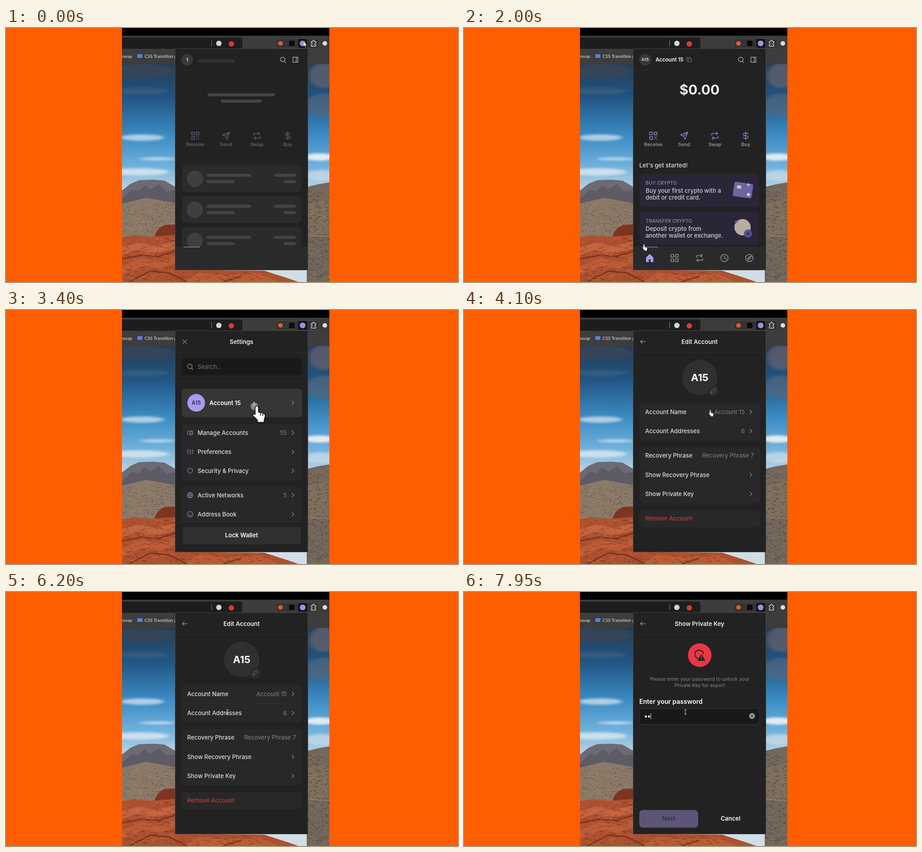
An HTML page for the animation above (8000 ms loop, 998 by 561 pixels).

```html
<!DOCTYPE html>
<html lang="en">
<head>
<meta charset="utf-8">
<title>Wallet popup</title>
<style>
html, body { margin: 0; width: 100%; height: 100%; overflow: hidden; background: #ff5e00; }
svg { display: block; width: 100%; height: 100%; }
text { font-family: Inter, sans-serif; white-space: pre; }
.bar text { font-family: Lato, sans-serif; }
</style>
</head>
<body>
<svg id="stage" viewBox="0 0 998 561"></svg>
<script>
const LOOP = 8000;
const LILAC = '#a99bee';

// Drawing helpers
const rect = (x, y, w, h, fill, r = 0, extra = '') =>
  `<rect x="${x}" y="${y}" width="${w}" height="${h}" rx="${r}" fill="${fill}" ${extra}/>`;
const disc = (x, y, r, fill, extra = '') => `<circle cx="${x}" cy="${y}" r="${r}" fill="${fill}" ${extra}/>`;
const shape = (d, fill, extra = '') => `<path d="${d}" fill="${fill}" ${extra}/>`;
const icon = (x, y, d, color = '#aaa', width = 1.4) =>
  `<path transform="translate(${x} ${y})" d="${d}" fill="none" stroke="${color}" stroke-width="${width}" stroke-linecap="round" stroke-linejoin="round"/>`;
const text = (x, y, str, color = '#ddd', size = 12.9, weight = 500, anchor = 'start') =>
  `<text x="${x}" y="${y + size * 0.36}" fill="${color}" font-size="${size}" font-weight="${weight}" text-anchor="${anchor}">${str}</text>`;
const centered = (x, y, str, color, size, weight = 600) => text(x, y, str, color, size, weight, 'middle');
const group = (id, body, extra = '') => `<g id="${id}" ${extra}>${body}</g>`;
const rule = (y, x = 374, w = 292) => rect(x, y, w, 1, '#2e2e2e');
const panel = (y, h, fill = '#282828') => rect(388, y, 266, h, fill, 8);

let seed = 7;
const random = () => (seed = seed * 16807 % 2147483647) / 2147483647;
function specks(count, x, y, w, h, color, length, opacity) {
  let d = '';
  for (let i = 0; i < count; i++) {
    const px = x + random() * w, py = y + random() * h;
    d += `M${px.toFixed(1)} ${py.toFixed(1)}l${(length * random()).toFixed(1)} ${((random() - 0.5) * length / 3).toFixed(1)}`;
  }
  return `<path d="${d}" stroke="${color}" stroke-width="1.3" opacity="${opacity}"/>`;
}

const ICONS = {
  search: 'M4 4L6.5 6.5M5-.5A5 5 0 1 1-5-.5A5 5 0 1 1 5-.5',
  side: 'M-5.5-5.5h11v11h-11zM2-5.5v11',
  copy: 'M-2-2h7v7h-7zM-2 2h-3v-7h7v3',
  close: 'M-4-4L4 4M4-4L-4 4',
  back: 'M6 0H-5M-1-4L-5 0L-1 4',
  next: 'M-2-4L2 0L-2 4',
  qr: 'M-8-8h6v6h-6zM2-8h6v6h-6zM-8 2h6v6h-6zM2 2h2M7 2h1M4 5h2M2 8h1M7 8h1',
  send: 'M8-8L-8-2L-1 1L2 8ZM-1 1L8-8',
  swap: 'M-7-1V-5H6M3-8L6-5L3-2M7 1V5H-6M-3 2L-6 5L-3 8',
  buy: 'M0-9V9M5-4Q4-6 0-6Q-5-6-5-3T0 0T5 3T0 6Q-4 6-5 4',
  grid: 'M-8-8h6v6h-6zM2-8h6v6h-6zM-8 2h6v6h-6zM2 2h6v6h-6z',
  clock: 'M8 0A8 8 0 1 1-8 0A8 8 0 1 1 8 0M0-5V0L4 2',
  compass: 'M8 0A8 8 0 1 1-8 0A8 8 0 1 1 8 0M4-4L1.5 1.5L-4 4L-1.5-1.5Z',
  wallet: 'M5-2V-4H-3Q-5.5-4-5.5-1V2Q-5.5 4.5-3 4.5H3Q5 4.5 5 2M6-2H1Q-1-2-1 0T1 2H6Z',
  sliders: 'M-5-5V-1M-5 2V5M0-5V1M0 4V5M5-5V-3M5 0V5M-6.5-1h3M-1.5 3h3M3.5-1.5h3',
  shield: 'M0-6L5-4V0Q5 4 0 6Q-5 4-5 0V-4Z',
  globe: 'M6 0A6 6 0 1 1-6 0A6 6 0 1 1 6 0M-6 0H6M0-6Q-5 0 0 6Q5 0 0-6',
  face: 'M6 0A6 6 0 1 1-6 0A6 6 0 1 1 6 0M-2-1.5v.2M2-1.5v.2M-2.5 2Q0 4 2.5 2',
  pencil: 'M-5 5L-4 1L2-5Q4-6 5-4T5-2L-1 4Z',
  puzzle: 'M-5-4H-2Q-2-7 0-7T2-4H5V-1Q3-1 3 1T5 3V6H-5V3Q-3 3-3 1T-5-1Z'
};
const chevron = y => icon(633.5, y, ICONS.next, '#858585');

function scenery() {
  const cloud = (x, y, rx, ry, color, opacity) =>
    `<ellipse cx="${x}" cy="${y}" rx="${rx}" ry="${ry}" fill="${color}" opacity="${opacity}" filter="url(#soft)"/>`;
  return rect(256, 78, 458, 483, 'url(#sky)') +
    cloud(300, 95, 70, 16, '#3d4756', 0.7) + cloud(300, 139, 60, 7, '#536d86', 0.4) +
    cloud(701, 105, 32, 28, '#5b5f70', 0.85) + cloud(700, 170, 38, 25, '#59677d', 0.65) +
    cloud(301, 242, 48, 7, '#d7e4ed', 0.75) + cloud(335, 289, 40, 3, '#e4eef5', 0.75) +
    cloud(295, 318, 65, 8, '#dfe9f0', 0.8) + cloud(692, 285, 34, 8, '#f0f3f4', 0.9) +
    cloud(695, 326, 35, 12, '#d0dfe9', 0.65) +
    shape('M256 359L275 344L294 336L325 335L350 337L374 351V395H256Z', '#6d6a73') +
    shape('M256 378L278 357L292 361L306 347L319 357L337 345L355 361L374 358V395H256Z', '#55535f', 'opacity=".65"') +
    shape('M256 388L310 375L374 387V561H256Z', '#8b7968') +
    shape('M664 351L690 345L714 341V561H664Z', '#74675b') +
    shape('M664 390L714 376V455H664Z', '#85735f', 'opacity=".7"') +
    specks(260, 256, 388, 118, 72, '#4a4238', 5, 0.5) +
    specks(130, 256, 388, 118, 72, '#b39c80', 4, 0.5) +
    specks(260, 664, 355, 50, 202, '#3d3834', 6, 0.6) +
    specks(130, 664, 355, 50, 202, '#a8967e', 4, 0.4) +
    shape('M664 457L714 461', 'none', 'stroke="#a99987"') +
    shape('M328 461Q333 441 352 435L374 434V475H328Z', '#7e3520') +
    shape('M256 462L280 458L320 461L374 457V534L570 536L620 552L646 561H256Z', '#ad5130') +
    shape('M256 484L293 474L329 482L374 472V488L330 496L287 490L256 502Z', '#c96a41', 'opacity=".8"') +
    shape('M256 526L300 508L340 516L374 503V518L340 532L306 525L256 545ZM392 561L430 540L480 546L560 541L600 561Z', '#c4623a', 'opacity=".7"') +
    shape('M256 510L299 502L335 505L374 493M272 561L318 537L360 541L400 561M480 561L520 548', 'none', 'stroke="#662b1c" stroke-width="3" opacity=".7"') +
    specks(150, 256, 465, 118, 94, '#692e1e', 11, 0.55) +
    specks(80, 256, 465, 118, 94, '#dc8057', 9, 0.5) +
    specks(90, 374, 538, 200, 22, '#692e1e', 11, 0.5);
}

function browser() {
  return rect(256, 0, 458, 18, '#000') + rect(256, 17, 458, 62, '#3c3c3c') +
    rect(250, 21, 272, 25, '#1d1d1d', 5) + rect(256, 46, 458, 33, '#3d3d3d') +
    rect(453.5, 27, 1, 13, '#888') +
    disc(470, 34, 6, '#d4d4d4') + disc(497.5, 35, 6, '#d83b31') +
    rect(595.5, 23.5, 96, 21, '#343434', 5, 'stroke="#56483f"') +
    disc(606, 34, 5, '#e8592f') + rect(625, 28, 12, 12, '#0b0b0b', 1) +
    rect(645, 24, 20, 20, '#15131d', 4) + disc(655, 34, 6.3, '#9f91df') +
    icon(679, 34, ICONS.puzzle, '#d5d5d5', 1.3) + disc(704, 34, 5, '#dedede') +
    text(256, 62, 'swap', '#ddd', 10, 400) + rect(290, 58, 11, 8, '#5b81d8') +
    text(306, 62, 'CSS Transition g', '#e5e5e5', 10, 400);
}

function homePage() {
  const actions = [['qr', 'Receive'], ['send', 'Send'], ['swap', 'Swap'], ['buy', 'Buy']]
    .map(([name, label], i) => icon(418 + 68 * i, 238, ICONS[name], '#8e84c6', 1.5) +
      centered(418 + 68 * i, 257.5, label, '#929292', 10.7)).join('');
  const row = y => rect(388, y, 264, 59, '#2b2b2b', 8) + disc(417, y + 30, 18, '#403f3d') +
    [[443, 19, 98], [443, 33, 61], [592, 19, 48], [613, 33, 27]]
      .map(([x, dy, w]) => rect(x, y + dy, w, 6.5, '#454443', 3)).join('');
  const card = (y, title, first, second) => rect(388, y, 264, 73, '#292637', 8) +
    text(401, y + 20, title, '#918d9a', 10.7) + text(401, y + 37, first, '#cfcdd4') + text(401, y + 52, second, '#cfcdd4');
  const nav = shape('M402 507L410 499L418 507V517H412V511H408V517H402Z', LILAC) +
    ['grid', 'swap', 'clock', 'compass'].map((name, i) => icon(465 + 55 * i, 508, ICONS[name], '#949494', 1.6)).join('');
  return rect(374, 46, 292, 488, '#222') + rule(93) +
    disc(400, 70, 13, '#383838') +
    group('waitName', centered(400, 70, '1', '#eee', 10.5) + rect(424, 69, 80, 8, '#303030', 2)) +
    group('accountName', centered(400, 70, 'A15', '#ddd', 9.5) + text(423, 70, 'Account 15', '#fff', 11.5, 600) + icon(497, 70, ICONS.copy, '#777', 1.1)) +
    icon(611, 70, ICONS.search, '#aaa') + icon(639, 70, ICONS.side, '#aaa') +
    group('waitBalance', rect(445, 144, 149, 7, '#454443', 3) + rect(474, 158, 91, 7, '#454443', 3)) +
    group('balance', centered(520, 136, '$0.00', '#eee', 30, 700)) +
    group('actions', actions) +
    `<g clip-path="url(#list)">` +
    group('waitRows', [303, 371.5, 440].map(row).join('')) +
    group('cards', text(387, 303, 'Let\'s get started!', '#ccc', 13, 600) +
      card(322, 'BUY CRYPTO', 'Buy your first crypto with a', 'debit or credit card.') +
      `<g transform="rotate(8 616 358)">${rect(595, 342, 42, 32, '#71659f', 4)}${rect(602, 349, 9, 7, '#d6c4a8', 1)}</g>` +
      disc(628, 368, 3.5, '#d3cfe0') + icon(628, 346, 'M0-3V3M-3 0H3', '#d6d1e8') +
      group('deposit', card(406, 'TRANSFER CRYPTO', 'Deposit crypto from', 'another wallet or exchange.') +
        disc(615, 440, 18, '#b9ada2') + disc(627, 454, 9, '#555298') + icon(627, 454, 'M-4 0H4M0-4V4', '#27264a') +
        icon(601, 428, 'M0-3V3M-3 0H3', '#6d67ac', 2))) +
    '</g>' + rect(374, 483, 292, 51, '#2a2a2a') + rect(392, 483, 36, 1.5, '#817caf') + group('nav', nav);
}

const pageTop = (title, symbol) => rect(374, 46, 292, 488, '#222') + rule(93) +
  icon(394.5, 70, ICONS[symbol], '#898989') + centered(520, 70, title, '#eee', 13);

function settingsPage() {
  const row = (y, name, label, count = '') => icon(406.5, y, ICONS[name], '#8f91ce', 1.1) +
    text(423, y, label) + text(620, y, count, '#808080', 12.9, 400, 'end') + chevron(y);
  return pageTop('Settings', 'close') + rect(389, 106, 264, 38, '#191919', 4) +
    icon(406, 125, ICONS.search, '#888') + text(423, 125, 'Search...', '#777', 12.9, 400) + rule(156) +
    panel(174, 63) + group('hover', panel(174, 63, '#363636')) + disc(420, 205, 19.5, LILAC) +
    centered(420, 205, 'A15', '#302b45', 11.8) + text(449, 205, 'Account 15', '#fff', 13, 600) + chevron(205) +
    panel(252, 124) + rule(292, 389, 264) + rule(334, 389, 264) +
    row(271, 'wallet', 'Manage Accounts', 55) + row(313, 'sliders', 'Preferences') + row(355, 'shield', 'Security &amp; Privacy') +
    panel(390, 100) + rule(430, 389, 264) + row(409, 'globe', 'Active Networks', 5) + row(451, 'face', 'Address Book') +
    rect(374, 468, 292, 66, '#222') + rule(468) + rect(390, 479, 261, 38, '#303030', 4) + centered(520, 497.5, 'Lock Wallet', '#fff', 13);
}

function editPage() {
  const row = (y, label, value = '', arrow = true) => text(400, y, label) +
    text(arrow ? 620 : 640, y, value, '#838383', 12.9, 400, 'end') + (arrow ? chevron(y) : '');
  return pageTop('Edit Account', 'back') + disc(520.5, 149, 39, '#303030') + centered(520.5, 149, 'A15', '#fff', 22, 700) +
    disc(550, 179, 12, '#2c2c2c') + icon(550, 179, ICONS.pencil, '#858585', 1) +
    panel(206, 82) + rule(246, 389, 264) + row(225, 'Account Name', 'Account 15') + row(267, 'Account Addresses', 6) +
    panel(303, 124) + rule(343, 389, 264) + rule(385, 389, 264) +
    row(321.5, 'Recovery Phrase', 'Recovery Phrase 7', false) + row(364, 'Show Recovery Phrase') + row(406, 'Show Private Key') +
    panel(442, 38) + text(400, 460, 'Remove Account', '#c93636');
}

function passwordPage() {
  return pageTop('Show Private Key', 'back') + disc(520.5, 139.5, 26, '#e93745') +
    icon(519, 139, 'M-3 8Q-9 5-9-1V-7L0-11L9-7V-2', '#292326', 2) + shape('M524 137L533 152H515Z', '#292326') +
    icon(524, 146, 'M0-4V0M0 3V3.2', '#e93745', 1.5) +
    centered(520.5, 192, 'Please enter your password to unlock your', '#868686', 10.9, 400) +
    centered(520.5, 206, 'Private Key for export', '#868686', 10.9, 400) +
    text(387, 242, 'Enter your password', '#fff', 14, 600) +
    rect(387.5, 257.5, 265, 35, '#191919', 8, 'stroke="#353535"') +
    group('dot1', disc(401.5, 275, 2.4, '#eee') + disc(636, 274, 6.5, '#999') + icon(636, 274, 'M-2-2L2 2M2-2L-2 2', '#222')) +
    group('dot2', disc(408.5, 275, 2.4, '#eee')) + group('caret', rect(398, 268, 1, 13, '#ddd')) +
    rect(387, 481.5, 130, 39, '#5e5478', 8) + centered(452, 500, 'Next', '#2d3037', 13) + centered(588.5, 500, 'Cancel', '#fff', 13);
}

const HAND = 'M-2 1Q-2-.5-.5-.5T1 1V5L5 6Q7 6.5 7 8.5L6 12V14H0V12L-4 8Q-4 6-2 7Z';
const hand = shape(HAND, '#fff', 'stroke="#111" stroke-width=".7"') +
  shape('M2.8 6V8M4.8 6.4V8.4', 'none', 'stroke="#222" stroke-width=".7"');
const pointer = group('arrow', shape('M0-5V7L3 4.5L5 9L7 8L5 4L9 4Z', '#fff', 'stroke="#111" stroke-width=".7"')) +
  group('hand', hand) + group('beam', icon(0, 0, 'M-2-5Q0-5 0-4V4Q0 5-2 5M2-5Q0-5 0-4M0 4Q0 5 2 5', '#bbb', 1.3));

document.getElementById('stage').innerHTML = `<defs>
  <linearGradient id="sky" gradientUnits="userSpaceOnUse" x1="0" y1="78" x2="0" y2="370">
    <stop stop-color="#263d56"/><stop offset=".25" stop-color="#205482"/><stop offset=".55" stop-color="#3c8cc4"/>
    <stop offset=".78" stop-color="#70b1dc"/><stop offset="1" stop-color="#cfdee7"/>
  </linearGradient>
  <filter id="soft" x="-50%" y="-100%" width="200%" height="300%"><feGaussianBlur stdDeviation="5 2.5"/></filter>
  <clipPath id="video"><rect x="256" width="458" height="561"/></clipPath>
  <clipPath id="popup"><rect x="374" y="46" width="292" height="488"/></clipPath>
  <clipPath id="list"><rect x="374" y="290" width="292" height="193"/></clipPath>
</defs>` + rect(0, 0, 998, 561, '#ff5e00') +
  `<g clip-path="url(#video)">${scenery()}<g class="bar">${browser()}</g></g>` +
  `<g clip-path="url(#popup)">${group('home', homePage())}${group('settings', settingsPage())}${group('edit', editPage())}${group('password', passwordPage())}</g>` +
  rect(373.5, 45.5, 293, 489, 'none', 0, 'stroke="#424242"') +
  group('pointer', pointer) +
  group('click', disc(548.5, 213, 8.5, '#9a9a9a', 'opacity=".8"') + `<g transform="translate(555 213) scale(2.5)">${hand}</g>`);

// Motion: each track is a list of [ms, value, easing]
const start = document.timeline.currentTime;
function track(id, property, steps) {
  const full = [[0, steps[0][1]], ...steps, [LOOP, steps.at(-1)[1]]];
  const frames = full.map(([time, value, easing = 'linear']) => ({ offset: time / LOOP, [property]: value, easing }));
  document.getElementById(id).animate(frames, { duration: LOOP, iterations: Infinity }).startTime = start;
}
const fade = (id, ...steps) => track(id, 'opacity', steps);
const show = (id, from, to = LOOP) => fade(id, [0, from > 0 ? 0 : 1], [from, from > 0 ? 0 : 1], [from, 1], [to, 1], [to, to < LOOP ? 0 : 1]);
const slide = (id, ...steps) => track(id, 'transform', steps.map(([time, x, y, easing]) => [time, `translate(${x}px, ${y}px)`, easing]));

show('waitName', 0, 400);
show('accountName', 400);
fade('nav', [450, 0], [600, 1]);
fade('waitRows', [650, 1], [800, 0]);
fade('cards', [700, 0], [900, 1]);
fade('deposit', [850, 0.4], [1150, 0.7], [1350, 1]);
fade('waitBalance', [1250, 1], [1400, 0]);
fade('balance', [1300, 0], [1450, 1]);
fade('actions', [0, 0.58], [1250, 0.58], [1450, 1]);
fade('home', [2350, 1], [2500, 0.8], [2800, 0.6]);

slide('settings', [2350, 0, 488, 'ease-in'], [2500, 0, 112, 'ease-out'], [2750, 0, 0]);
show('hover', 3100);
slide('edit', [3550, 292, 0, 'cubic-bezier(.2,.7,.2,1)'], [3850, 0, 0]);
slide('password', [6300, 292, 0, 'cubic-bezier(.2,.7,.2,1)'], [6600, 0, 0]);
show('dot1', 7600);
show('dot2', 7850);
slide('caret', [0, 0, 0], [7600, 0, 0], [7600, 7, 0], [7850, 7, 0], [7850, 14, 0]);

slide('pointer', [0, 656, 34], [350, 656, 34, 'ease-in-out'], [1050, 398, 80], [1400, 398, 80, 'ease-in-out'],
  [2150, 398, 513], [2700, 398, 513, 'ease-in-out'], [3200, 548, 203], [3950, 548, 203, 'ease-in-out'],
  [4650, 509, 393], [5150, 509, 393, 'ease-in-out'], [5750, 489, 265]);
show('arrow', 0, 950);
show('hand', 950, 5550);
show('beam', 5550);
show('click', 3280, 3560);
</script>
</body>
</html>
```
